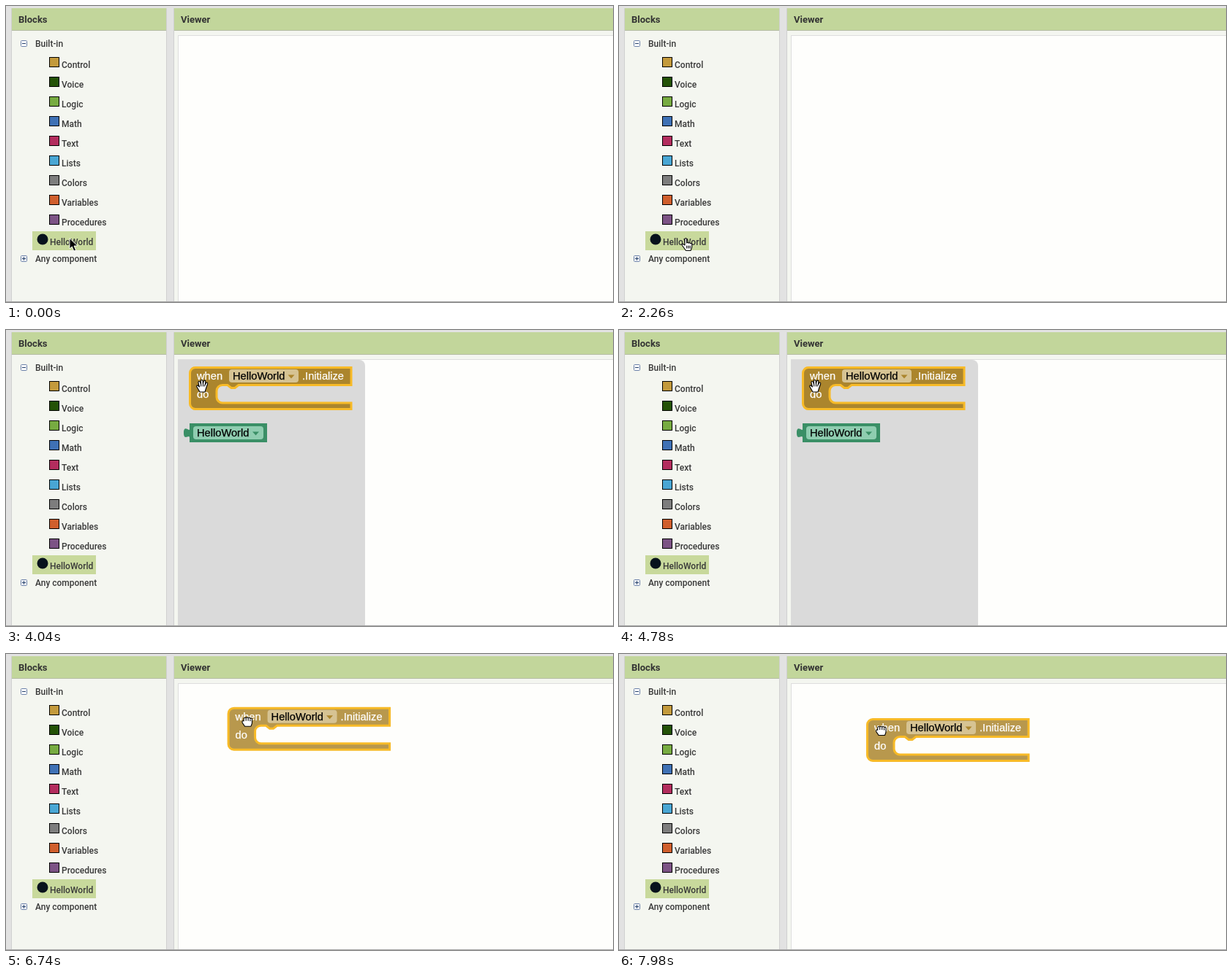
Recreate the animation shown at these times as an HTML page. Size 830x406 px, loop 8 s.

```html
<!DOCTYPE html>
<html lang="en">
<head>
<meta charset="utf-8">
<title>Blocks</title>
<style>
  html, body { margin: 0; width: 100%; height: 100%; overflow: hidden; background: #e2e2e2; }
  svg { display: block; }
  text { font: 500 12px Roboto, sans-serif; fill: #393939; }
  .title { font-weight: 700; font-size: 13px; fill: #333; }
  .code text { font: 14.667px "Liberation Sans", Arial, sans-serif; fill: #fff; stroke: #fff; stroke-width: .25; }
  .code .field { fill: #000; stroke: #000; }
  .cursor { stroke: #000; stroke-width: 1.1; stroke-linejoin: round; stroke-linecap: round; fill: #fff; }
</style>
</head>
<body>
<svg width="830" height="406" viewBox="0 0 830 406">
  <rect width="830" height="406" fill="#e2e2e2"/>
  <g id="panels"></g>
  <g id="tree"></g>

  <rect x="235.5" y="40.5" width="600" height="370" fill="#fefefc" stroke="#dedede"/>
  <g id="flyout">
    <path d="M235 41H483a8 8 0 0 1 8 8V406H235Z" fill="#dadada"/>
    <g class="code">
      <path d="M251 128H357V154H251V148c0-6-8 5-8-7s8-1 8-5Z" fill="#3a8f66"/>
      <rect x="256" y="132" width="96" height="18" rx="4" fill="#8fcdb0"/>
      <text class="field" x="261" y="146">HelloWorld</text>
      <path d="M337 139.500h9l-4.500 5Z" fill="#3a8f66"/>
    </g>
  </g>
  <path d="M0 405.500H830" stroke="#a8a8a8"/>

  <g id="event" class="code">
    <path id="shape" fill="#ab852d" stroke-width="3"
      d="M259 51.500H472V75.500H318l-5 4h-5l-5-4H296a8 8 0 0 0-8 8V92a8 8 0 0 0 8 8H472V108.500H259a7.500 7.500 0 0 1-7.500-7.500V59a7.500 7.500 0 0 1 7.500-7.500Z"/>
    <rect x="305" y="54" width="95" height="18" rx="4" fill="#d6c393"/>
    <text x="261" y="68">when</text>
    <text class="field" x="310" y="68">HelloWorld</text>
    <path d="M385.500 61.500h9l-4.500 5Z" fill="#ab852d"/>
    <text x="405" y="68">.Initialize</text>
    <text x="261" y="93">do</text>
  </g>

  <g id="arrow" class="cursor">
    <path d="M-6-8V6l3.300-3 2.500 6 2.700-1.200L0 2H4.500Z" fill="#000" stroke="#fff" stroke-width=".9"/>
  </g>
  <g id="pointer" class="cursor">
    <path d="M-3 1V-7c0-2 2.600-2 2.600 0v5c.5-1.200 2.300-1 2.600.3.600-1 2.200-.7 2.500.6.700-.8 2-.3 2 1V3c0 2-1 3.500-1.700 5.500H-1.500L-6.500 1.500c-1.200-1.800.6-2.800 2-1.500Z"/>
    <path d="M-.3 2v3M2 2v3M4.200 2v3" fill="none"/>
  </g>
  <g id="open" class="cursor">
    <path d="M-3 8-7 1c-1-2 1-3 2.300-1L-3.500 1-5-4.500c-.4-2.300 2-2.700 2.600-.8l1 3-.3-4.500c0-2.300 2.700-2.300 2.800 0l.3 4 .8-3.700c.5-2.200 2.900-1.600 2.600.5l-.5 4 1-2c1-1.800 2.800-.7 2.300 1L5.500 3 4 8Z"/>
    <path d="M-1.300-2v2M1.500-2.500V0M4-2 3.600 0" fill="none"/>
  </g>
  <g id="fist" class="cursor">
    <path d="M-3 7c-1-2.500-3.500-4-3.500-6 0-1.500 1-2 2.200-1.300V-3c0-2.300 2.500-2.600 3-.8.300-2 2.700-2 3 0 .6-1.700 2.600-1.500 2.800.3 1-1.300 2.500-.6 2.500.9V2c0 2-1 3-1.500 5Z"/>
    <path d="M-1.300-3v2M1.700-3v2M4.500-2.500v2" fill="none"/>
  </g>
</svg>
<script>
const LOOP = 8000;
const HOVER_LABEL = 1000, OPEN_FLYOUT = 2360, LEAVE_LABEL = 3500;
const HOVER_BLOCK = 3840, GRAB = 5400, DRAG = 6340;
const $ = id => document.getElementById(id);

const label = (text, x, y, cls = "") => `<text class="${cls}" x="${x}" y="${y}">${text}</text>`;

const panel = (title, x, width) => `
  <rect x="${x}" y="3" width="${width}" height="403" fill="#f4f6f0"/>
  <rect x="${x}" y="3" width="${width}" height="30" fill="#c2d69b"/>
  <path d="M${x} 33.5h${width}" stroke="#b5bda6"/>
  <path d="M${x + .5} 3v403M${x + width - .5} 3v403" stroke="#d0d0d0"/>
  ${label(title, x + 10, 23, "title")}`;

const toggle = (y, sign) => `
  <rect x="20.500" y="${y - 4}" width="8" height="8" rx="1" fill="#fff" stroke="#6a80a8"/>
  <path d="M22 ${y}h5${sign === "+" ? "m-2.500-2.500v5" : ""}" stroke="#24406b"/>`;

const drawers = [
  ["Control", "#c39a3c"], ["Voice", "#245207"], ["Logic", "#77ab41"],
  ["Math", "#3f71b5"], ["Text", "#b32d5e"], ["Lists", "#49a6d4"],
  ["Colors", "#7d7d7d"], ["Variables", "#d05f2d"], ["Procedures", "#7c5385"]
];

$("panels").innerHTML = panel("Blocks", 7, 213) + panel("Viewer", 229, 610);
$("tree").innerHTML =
  toggle(51.5, "-") + label("Built-in", 40, 56) +
  drawers.map(([name, color], i) => `
    <rect x="59.500" y="${70.5 + 27 * i}" width="13" height="13" fill="${color}" stroke="#000"/>
    ${label(name, 76, 85 + 27 * i)}`).join("") +
  `<rect x="36" y="309" width="87" height="26" fill="#c8d99c"/>
   <circle cx="50" cy="320" r="7.500" fill="#07121c"/>` +
  label("HelloWorld", 60, 328) +
  toggle(346.5, "+") + label("Any component", 40, 351);

// Keys are [time, x, y]; every stretch eases in and out.
// The dragged block trails the cursor slightly.
const cursorPath = [
  [3420, 93, 327], [3960, 268, 77], [5000, 268, 77],
  [5400, 271, 67], [6260, 271, 67], [7040, 358, 104.5]
];
const blockPath = [[6300, 0, 0], [7080, 88, 38]];

function position(keys, t) {
  const next = keys.findIndex(key => key[0] > t);
  if (next === 0) return keys[0].slice(1);
  if (next < 0) return keys[keys.length - 1].slice(1);
  const [t0, x0, y0] = keys[next - 1], [t1, x1, y1] = keys[next];
  const u = (t - t0) / (t1 - t0), p = u * u * (3 - 2 * u);
  return [x0 + (x1 - x0) * p, y0 + (y1 - y0) * p];
}

function cursorKind(t) {
  if (t < HOVER_LABEL) return "arrow";
  if (t < LEAVE_LABEL) return "pointer";
  if (t < HOVER_BLOCK) return "arrow";
  return t < GRAB ? "open" : "fist";
}

const show = (id, visible) => $(id).style.display = visible ? "" : "none";
const move = (id, [x, y]) => $(id).setAttribute("transform", `translate(${x} ${y})`);

function draw(t) {
  const dragging = t >= DRAG;
  show("flyout", t >= OPEN_FLYOUT && !dragging);
  show("event", t >= OPEN_FLYOUT);
  move("event", position(blockPath, t));
  $("shape").setAttribute("stroke", t >= HOVER_BLOCK ? "#f7ba27" : "none");
  $("shape").setAttribute("fill-opacity", dragging ? .84 : 1);

  const kind = cursorKind(t), place = position(cursorPath, t);
  for (const id of ["arrow", "pointer", "open", "fist"]) {
    show(id, id === kind);
    move(id, place);
  }
}

const start = performance.now();
function tick() {
  draw((performance.now() - start) % LOOP);
  requestAnimationFrame(tick);
}
tick();
</script>
</body>
</html>
```
